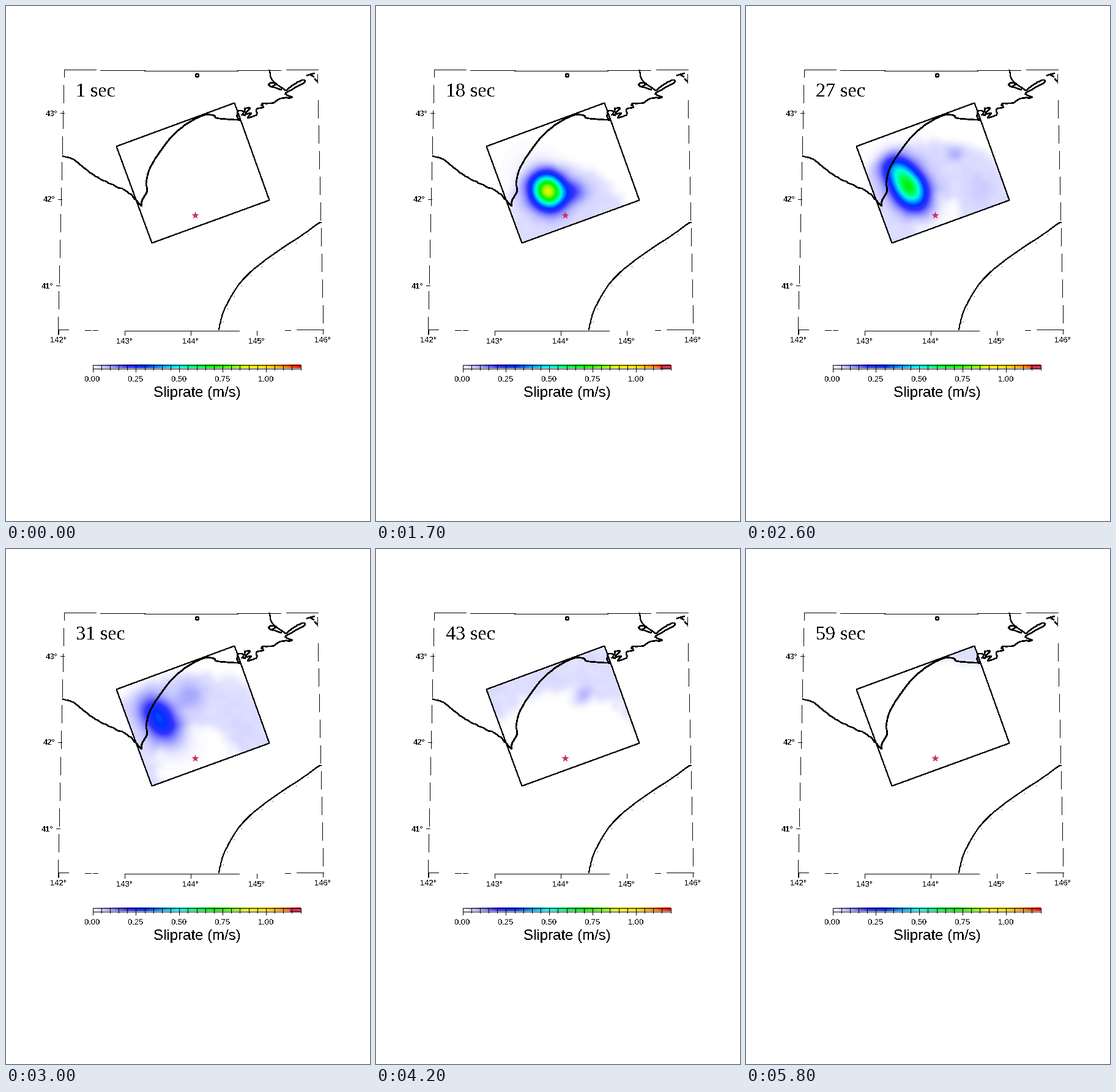
Animation of 595x842 px, one loop 5.9 s. Source, as a matplotlib script:

```python
import numpy as np
import matplotlib.pyplot as plt
from matplotlib.animation import FuncAnimation
from matplotlib.colors import LinearSegmentedColormap
from matplotlib.patches import Polygon, Rectangle
from matplotlib.transforms import Affine2D

W, H, DPI = 595, 842, 100
PX = 72 / DPI
FRAMES, STEP = 59, 100
CRIMSON = "#c8325a"
VMAX = 1.2
HYPO = (309, 342)

rng = np.random.default_rng(4)
fig = plt.figure(figsize=(W / DPI, H / DPI), dpi=DPI, facecolor="white")
ax = fig.add_axes([0, 0, 1, 1])
ax.axis("off")

# One colour per 0.1 m/s
RAMP = ["#ffffff", "#9999ff", "#3333ff", "#0030ff", "#00a0ff", "#00ffe6",
        "#00ff60", "#00f000", "#64fa00", "#f0f000", "#ffdc00", "#ff8c00",
        "#ff0000"]
cmap = LinearSegmentedColormap.from_list("slip", RAMP, 512)


def line(pts, lw=1.0):
    x, y = zip(*pts)
    ax.plot(x, y, color="black", lw=lw * PX, antialiased=False,
            solid_capstyle="butt", zorder=3)


def spline(pts, n=8):
    """Catmull-Rom curve through the points."""
    p = np.array(pts, float)
    p = np.vstack([2 * p[0] - p[1], p, 2 * p[-1] - p[-2]])
    u = np.linspace(0, 1, n, endpoint=False)[:, None]
    out = []
    for a, b, c, d in zip(p, p[1:], p[2:], p[3:]):
        out.append(b + u / 2 * (c - a + u * (2 * a - 5 * b + 4 * c - d
                                             + u * (3 * (b - c) + d - a))))
    return np.vstack(out + [p[-2:-1]])


def coast(pts, lw=1.3, jitter=.4, n=8):
    q = spline(pts, n)
    q[1:-1] += rng.normal(0, jitter, q[1:-1].shape)
    line(q, lw)
    return q


def label(x, y, s, size, family="Liberation Sans", ha="center"):
    return ax.text(x, y, s, fontsize=size * PX, family=family, ha=ha,
                   va="baseline", antialiased=False, zorder=4)


def sag(x, y, half):
    """Parallel of latitude, lowest at the middle meridian."""
    return round(y + 2 - 2 * ((x - 301) / half) ** 2)


def draw_frame():
    top = [(94, 146), (153, 226), (225, 378), (377, 448), (457, 509)]
    bottom = [(84, 101), (128, 138), (141, 149), (193, 380), (455, 464),
              (474, 518)]
    for spans, y, half in [(top, 103, 208), (bottom, 528, 216)]:
        for a, b in spans:
            level = sag((a + b) / 2, y, half)
            line([(a, level), (b, level)])
    line([(94, 103), (94, 115)])
    line([(508, 110), (508, 125)])
    for k in range(10):
        y = 128 + 42.2 * k
        line([(93 - k, y), (93 - k, y + 29)])
    for k in range(9):
        y = 153 + 41.9 * k
        line([(509 + k, y), (509 + k, y + 29)])
    for k in range(5):
        x = 85 + 108 * k
        y = 528 if k in (0, 4) else 530
        line([(x, y), (x, y + 7)])
        label(x, y + 21, f"{142 + k}°", 13)
    for k in range(3):
        x, y = round(92.7 - 3.5 * k), 174 + 141 * k
        line([(x - 5, y), (x + 1, y)])
        label(x - 9, y + 5, f"{43 - k}°", 13, ha="right")


def draw_coasts():
    coast([(92, 245), (112, 252), (138, 273), (170, 290), (196, 302),
           (212, 317), (221, 327)])
    coast([(221, 327), (222, 317), (230, 302), (229, 287), (236, 262),
           (262, 223), (288, 197), (322, 178), (340, 179), (345, 183),
           (383, 186)], 1.6, .2)
    coast([(383, 186), (377, 181), (379, 171), (388, 172), (386, 178),
           (391, 177), (390, 167), (398, 166), (392, 175), (400, 175),
           (395, 182), (408, 178), (410, 168), (420, 165), (418, 159),
           (437, 158), (450, 150), (467, 149), (456, 142), (483, 128),
           (488, 121), (476, 124), (457, 138)], 1.4, .5, 5)
    coast([(430, 104), (435, 121), (457, 138)], 1.2, .2)
    coast([(450, 136), (430, 130), (433, 125), (440, 127), (434, 132)], 1.4)
    coast([(491, 113), (503, 110), (497, 112), (503, 115)], 1.4, .2, 4)
    coast([(504, 119), (508, 122)], 1.4, .2, 3)
    a = np.linspace(0, 2 * np.pi, 9)
    line(np.c_[312 + 2.6 * np.cos(a), 113 + 2.6 * np.sin(a)], 1.4)

    trench = coast([(347, 529), (356, 497), (378, 458), (402, 432),
                    (440, 403), (485, 373), (510, 355), (515, 354)], 1, .12)
    s = np.r_[0, np.cumsum(np.hypot(*np.diff(trench, axis=0).T))]
    for d in 15 + 23 * np.arange(10):
        (x, y), (x2, y2) = (
            [np.interp(e, s, c) for c in trench.T] for e in (d, d + 9))
        r = np.hypot(x2 - x, y2 - y) / 5
        dot = (x - (y2 - y) / r - .5, y + (x2 - x) / r - .5)
        ax.add_patch(Rectangle(dot, 1, 1, fc="black", lw=0,
                               antialiased=False))


def draw_bar():
    ax.imshow(np.linspace(0, VMAX, 340)[None], cmap=cmap, vmin=0, vmax=VMAX,
              extent=(141, 481, 592, 586), aspect="auto", zorder=1)
    tip = ax.add_patch(Rectangle((463, 586), 18, 6, fc=CRIMSON, lw=0,
                                 zorder=2))
    line([(141, 586), (481, 586), (481, 592), (141, 592), (141, 586)])
    for k in range(25):
        x = 141 + 340 * k / 24
        line([(x, 586), (x, 594 if k % 5 else 597)])
        if k % 5 == 0:
            label(x, 614, f"{k * .05:.2f}", 13)
    label(312, 639, "Sliprate (m/s)", 24)
    return tip


# Slip field, sampled on a grid in the fault plane
FAULT = [(180, 229), (373, 158), (430, 317), (238, 387)]
CELL = 10
U, V = np.meshgrid(np.arange(-10, 221, CELL), np.arange(-10, 181, CELL))
X = 180 + .939 * U + .337 * V
Y = 229 - .345 * U + .941 * V
DIST = np.hypot(.85 * (X - HYPO[0]), Y - HYPO[1])
LEAD, LAG, ROUGH = (rng.normal(0, s, U.shape) for s in (3.5, 4, .004))


def smooth(x):
    x = np.clip(x, 0, 1)
    return x * x * (3 - 2 * x)


def blob(x, y, a, b, tilt):
    c, s = np.cos(np.radians(tilt)), np.sin(np.radians(tilt))
    p = ((X - x) * c + (Y - y) * s) / a
    q = ((Y - y) * c - (X - x) * s) / b
    return np.exp(-(p * p + q * q) / 2)


def pulse(t, peak, start, top, end, *shape):
    """Fixed patch that rises and dies away."""
    level = np.interp(t, [start, top, end], [0, peak, 0])
    return level * blob(*shape) if level else 0


def asperity(t):
    """The strong patch, drifting up and to the left."""
    peak = np.interp(t, [8, 10, 14, 18, 22, 27, 31, 35],
                     [0, .07, .45, .93, .85, .68, .28, 0])
    x = np.interp(t, [10, 18, 27, 35], [290, 281, 265, 240])
    y = np.interp(t, [10, 18, 27, 35], [323, 302, 294, 265])
    a = np.interp(t, [10, 18, 27], [7, 18, 26])
    return peak * blob(x, y, a, min(a, 16), 57)


def slip(t):
    front = 8 + 4.45 * t
    tail = np.interp(t, [16, 20, 36, 43, 59], [-30, 0, 80, 110, 163])
    band = smooth((front + LEAD - DIST) / 13)
    band = band * smooth((DIST + LAG - tail + 5) / 11)
    grow = min(1, (t - 7) / 3)
    z = band * grow * (.034 + ROUGH) + asperity(t)
    z = z + pulse(t, .09, 8, 10, 14, 346, 328, 8, 7, 0)
    z = z + pulse(t, .03, 8, 10, 15, 318, 336, 22, 12, -20)
    z = z + pulse(t, .14, 13, 18, 23, 322, 303, 15, 11, 0)
    z = z + pulse(t, .06, 14, 21, 34, 272, 296, 36, 26, 57)
    z = z + pulse(t, .17, 21, 27, 33, 242, 264, 14, 12, 0)
    z = z + pulse(t, .045, 29, 36, 40, 225, 258, 7, 7, 0)
    z = z + pulse(t, .08, 24, 27, 30, 341, 240, 7, 7, 0)
    z = z + pulse(t, .02, 22, 27, 33, 383, 298, 18, 14, 70)
    z = z + pulse(t, .21, 29, 36, 42, 300, 238, 15, 14, 0)
    z = z + pulse(t, .085, 38, 43, 47, 338, 241, 11, 7, -30)
    return np.clip(z, 0, VMAX)


draw_frame()
draw_coasts()
tip = draw_bar()

plane = Affine2D(np.array([[.939, .337, 180], [-.345, .941, 229], [0, 0, 1]]))
h = CELL / 2
field = ax.imshow(np.zeros_like(X), cmap=cmap, vmin=0, vmax=VMAX, zorder=1,
                  extent=(U.min() - h, U.max() + h, V.max() + h, V.min() - h),
                  interpolation="bicubic", interpolation_stage="data",
                  aspect="auto", transform=plane + ax.transData)
field.set_clip_path(Polygon(FAULT, transform=ax.transData))
line(FAULT + FAULT[:1])

ang = np.radians(-90 + 36 * np.arange(10))
rad = np.where(np.arange(10) % 2, 2.6, 6.5)
ax.add_patch(Polygon(np.c_[HYPO[0] + rad * np.cos(ang),
                           HYPO[1] + rad * np.sin(ang)],
                     fc=CRIMSON, lw=0, zorder=4))
clock = label(114, 147, "", 32, "Liberation Serif", "left")

ax.set_xlim(-.5, W - .5)
ax.set_ylim(H - .5, -.5)


def update(i):
    t = i + 1
    clock.set_text(f"{t} sec")
    field.set_data(slip(t))
    field.set_visible(t > 7)
    tip.set_visible(12 <= t <= 38)
    return clock, field, tip


anim = FuncAnimation(fig, update, frames=FRAMES, interval=STEP,
                     repeat=True, repeat_delay=0, blit=False)
plt.show()
```
